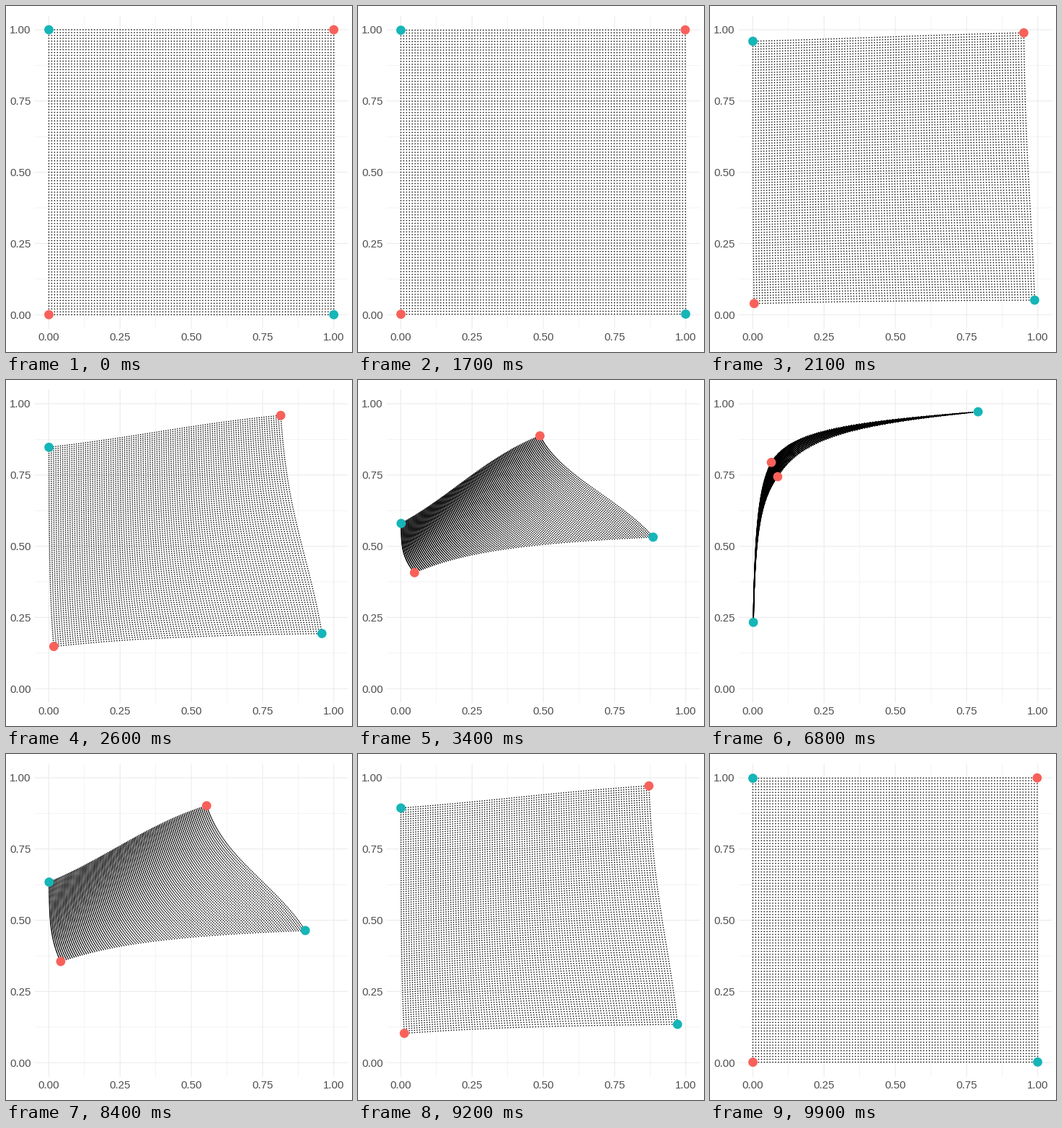
A matplotlib script that plays this animation: 480x480 px, repeating every 10000 ms.

```python
import numpy as np
import matplotlib.pyplot as plt
from matplotlib.animation import FuncAnimation

SIZE, DPI = 480, 72
FRAMES, INTERVAL = 100, 100
LEFT, TOP, SIDE = 39.7, 13.2, 434.8
SPAN = SIDE / 1.1
RED, TEAL, GRID, INK = "#F8615A", "#15B5B8", "#EBEBEB", "#4D4D4D"

# Hidden layer of two logistic units: rows are units.
WEIGHTS = np.array([[3.67, -4.03], [2.55, -2.278]])
BIAS = np.array([-2.345, 1.076])


def hidden(points):
    return 1 / (1 + np.exp(-(points @ WEIGHTS.T + BIAS)))


def progress(frame):
    """Share of the way to the hidden layer: rest, go, rest, return."""
    if frame <= 16:
        t = 0
    elif frame <= 50:
        t = (frame - 16) / 34
    elif frame <= 67:
        t = 1
    else:
        t = (100 - frame) / 33
    return (1 - np.cos(np.pi * t)) / 2


def to_px(points):
    x = LEFT + (points[:, 0] + 0.05) * SPAN
    y = TOP + (1.05 - points[:, 1]) * SPAN
    return np.column_stack([x, y])


def grid_lines(values, width):
    for v in values:
        (x, y), = to_px(np.array([[v, v]]))
        for xs, ys in (([x, x], [TOP, TOP + SIDE]), ([LEFT, LEFT + SIDE], [y, y])):
            ax.plot(xs, ys, color=GRID, lw=width, solid_capstyle="butt",
                    snap=False, zorder=1)


def tick_labels(values):
    style = dict(family="Liberation Sans", fontsize=15, color=INK, va="baseline")
    for v in values:
        (x, y), = to_px(np.array([[v, v]]))
        ax.text(x, 464, f"{v:.2f}", ha="center", **style)
        ax.text(34.8, y + 5.4, f"{v:.2f}", ha="right", **style)


fig = plt.figure(figsize=(SIZE / DPI, SIZE / DPI), dpi=DPI, facecolor="white")
ax = fig.add_axes([0, 0, 1, 1])
ax.set(xlim=(0, SIZE), ylim=(SIZE, 0))
ax.axis("off")

ticks = np.linspace(0, 1, 5)
grid_lines(ticks[:-1] + 0.125, 0.54)
grid_lines(ticks, 1.07)
tick_labels(ticks)

axis = np.linspace(0, 1, 101)
mesh = np.stack(np.meshgrid(axis, axis), axis=-1).reshape(-1, 2)
corners = np.array([[0, 0], [1, 1], [0, 1], [1, 0]], float)

# Two line widths keep the small dots at sub-pixel positions.
dots = ax.scatter(*to_px(mesh).T, s=1.65 ** 2, marker=(8, 0, 22.5), c="black",
                  edgecolors="none", linewidths=[0, 0], snap=False, zorder=2)
marks = ax.scatter(*to_px(corners).T, s=12.8 ** 2, c=[RED, RED, TEAL, TEAL],
                   edgecolors="none", snap=False, zorder=3)
layers = [(dots, mesh, hidden(mesh)), (marks, corners, hidden(corners))]


def update(frame):
    p = progress(frame)
    for artist, start, end in layers:
        artist.set_offsets(to_px(start + p * (end - start)))
    return dots, marks


anim = FuncAnimation(fig, update, frames=FRAMES, interval=INTERVAL,
                     repeat=True, repeat_delay=0)
plt.show()
```
